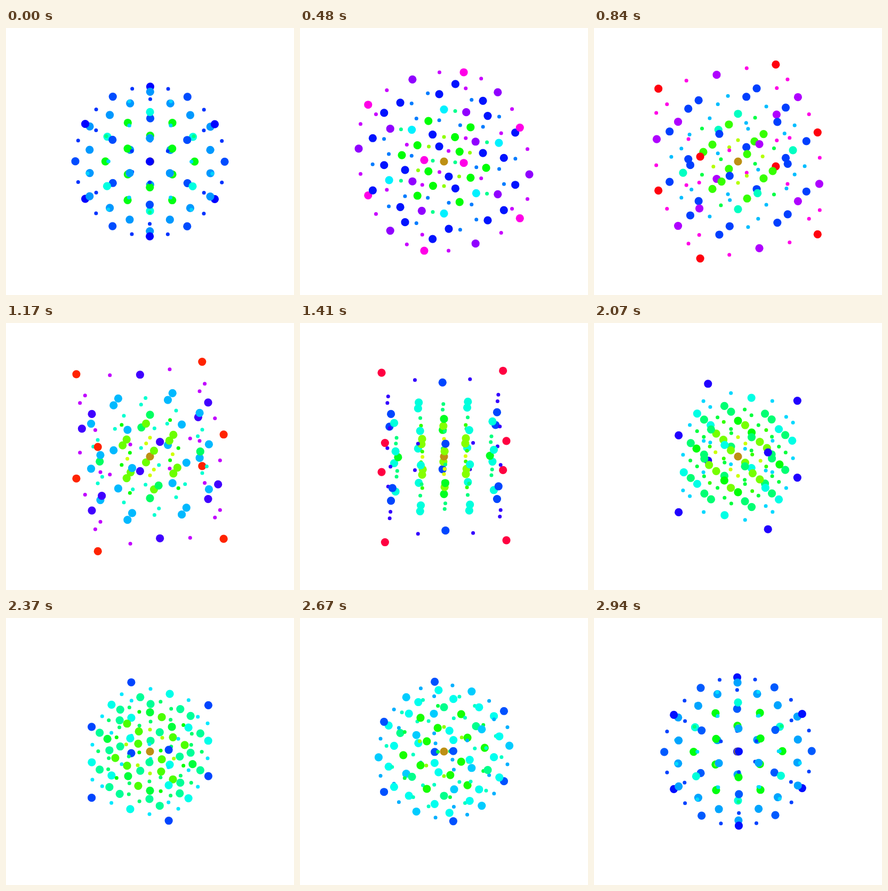
Write an HTML page with a canvas that moves like this. It is 540x500 px and loops after 2.97 s.

```html
<!DOCTYPE html>
<html lang="en">
<head>
<meta charset="utf-8">
<title>Breathing crystal lattice</title>
<style>
html, body { margin: 0; height: 100%; overflow: hidden; background: #fff; }
canvas { display: block; }
</style>
</head>
<body>
<canvas id="stage" width="540" height="500"></canvas>
<script>
const ctx = document.getElementById('stage').getContext('2d');
const TAU = 2 * Math.PI;
const FRAME_MS = 30, FRAMES = 99, STEPS = 100;
const UP = Math.sqrt(2 / 3), TILT = Math.sqrt(1 / 3); // camera looks along the cube diagonal

// Two kinds of atom alternate on a 5 x 5 x 5 cubic grid
const atoms = [];
for (let i = -2; i <= 2; i++)
  for (let j = -2; j <= 2; j++)
    for (let k = -2; k <= 2; k++)
      atoms.push({ i, j, k, d2: i * i + j * j + k * k, size: (i + j + k) % 2 ? 3.5 : 7.6 });

// Each shell swells between 40 and 60 px per unit, delayed by its squared distance
const spacing = (d2, phase) => 40 * 1.5 ** ((1 + Math.cos(phase - 0.19 * d2)) / 2);

function place({ i, j, k, d2, size }, phase, turn) {
  const s = spacing(d2, phase);
  const c = Math.cos(turn), n = Math.sin(turn);
  const side = i * c - j * n, back = i * n + j * c;
  const hue = 40 + 0.11 * (s * Math.sqrt(d2)) ** 1.5;
  return {
    x: 270 + s * side,
    y: 250 - s * (k * UP + back * TILT),
    depth: s * (k * TILT - back * UP),
    size,
    color: d2 ? `hsl(${hue % 360}, 100%, 50%)` : '#bd9013'
  };
}

function draw(ms) {
  const frame = Math.floor(ms / FRAME_MS) % FRAMES;
  const step = frame + (frame > 46 ? 1 : 0); // one step is skipped midway
  const phase = TAU * step / STEPS;
  const turn = (44.8 - 90 * step / STEPS) * Math.PI / 180;

  ctx.fillStyle = '#fff';
  ctx.fillRect(0, 0, 540, 500);
  const dots = atoms.map(a => place(a, phase, turn)).sort((a, b) => a.depth - b.depth);
  for (const { x, y, size, color } of dots) {
    ctx.fillStyle = color;
    ctx.beginPath();
    ctx.arc(x, y, size, 0, TAU);
    ctx.fill();
  }
}

const start = performance.now();
function tick() {
  draw(performance.now() - start);
  requestAnimationFrame(tick);
}
tick();
</script>
</body>
</html>
```
